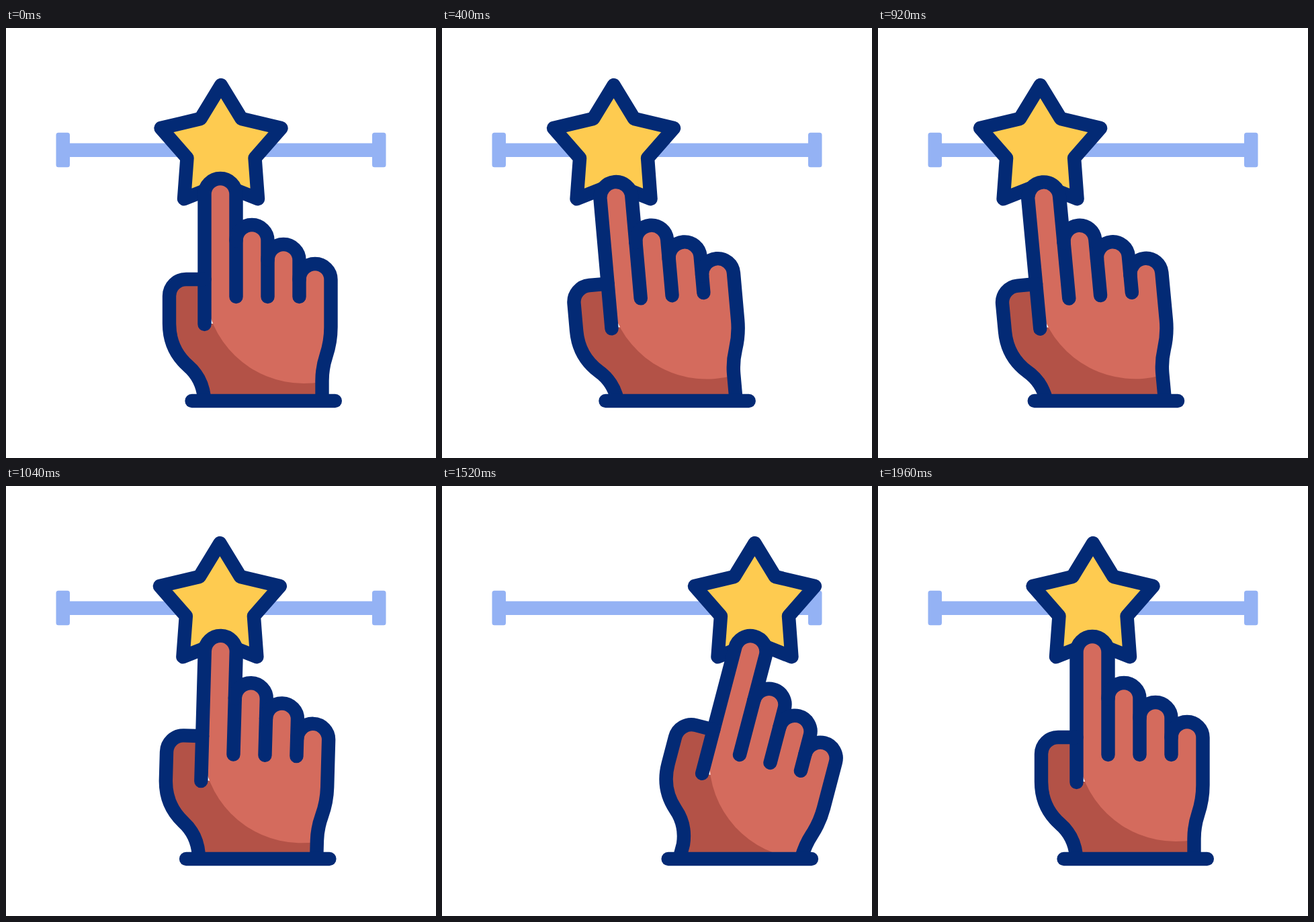
An HTML page for the animation above (2000 ms loop, 640 by 640 pixels).

```html
<!DOCTYPE html>
<html lang="en">
<head>
<meta charset="utf-8">
<title>Slide gesture</title>
<style>
  html, body { margin: 0; width: 100%; height: 100%; overflow: hidden; background: #fff; }
  svg { display: block; width: 100%; height: 100%; }
  .track { fill: #94b2f4; }
  .line { fill: none; stroke: #032a75; stroke-width: 20.4; stroke-linecap: round; stroke-linejoin: round; }
  .star { fill: #fecb50; }
  .skin { fill: #d46b5d; }
  .shade { fill: #b35247; }
</style>
</head>
<body>
<svg viewBox="0 0 640 640">
  <clipPath id="aboveCuff"><rect width="640" height="555"/></clipPath>

  <g class="track">
    <rect x="85" y="171.5" width="470" height="20.5"/>
    <rect x="74.5" y="155.8" width="20.5" height="51.5" rx="3.5"/>
    <rect x="545" y="155.8" width="20.5" height="51.5" rx="3.5"/>
  </g>

  <path id="star" class="line star" d="M320 85L350.5 135L409.5 149L370.5 193.5L375 254.3
    L320 232.5L265 254.3L269.5 193.5L230.5 149L289.5 135Z"/>

  <g clip-path="url(#aboveCuff)">
    <g id="hand">
      <path class="shade" d="M295.5 374H268a25 25 0 0 0-25 25V440C243 468 254 488 271 503
        C285 515 293 532 295 550V590H470.5V440H295.5Z"/>
      <path class="skin" d="M295.5 416V247.5a23.5 23.5 0 0 1 47 0V316.5a23.5 23.5 0 0 1 47 0
        V345.5a23.5 23.5 0 0 1 47 0V374.5a23.5 23.5 0 0 1 47 0V445c0 18-3 31-7 43c-4 12-6 24-6 37
        V526.4A147 147 0 0 1 300 416Z"/>
      <g class="line">
        <path d="M295.5 441V247.5a23.5 23.5 0 0 1 47 0V400"/>
        <path d="M342.5 316.5a23.5 23.5 0 0 1 47 0V400"/>
        <path d="M389.5 345.5a23.5 23.5 0 0 1 47 0V400"/>
        <path d="M436.5 374.5a23.5 23.5 0 0 1 47 0V445c0 18-3 31-7 43c-4 12-6 24-6 37V590"/>
        <path d="M295.5 374H268a25 25 0 0 0-25 25V440C243 468 254 488 271 503
          C285 515 293 532 295 550V590"/>
      </g>
    </g>
  </g>

  <path id="cuff" class="line" d="M276.5 555H489.8"/>
</svg>
<script>
  const LOOP = 2000, STEP = 40;
  // Each pose: time in ms, star shift, wrist shift, hand angle
  const poses = [
    [0, 0, 0, 0],
    [120, 0, 0, 0],
    [720, -143.2, -73.5, -11.2],
    [1400, 167.3, 69.2, 16.9],
    [1930, 0, 0, 0],
    [LOOP, 0, 0, 0]
  ];
  const [star, hand, cuff] = ["star", "hand", "cuff"].map(id => document.getElementById(id));
  const smooth = s => s * s * (3 - 2 * s);

  function poseAt(t) {
    const i = poses.findIndex(p => p[0] > t);
    const a = poses[i - 1], b = poses[i];
    const k = smooth((t - a[0]) / (b[0] - a[0]));
    return a.map((v, n) => v + (b[n] - v) * k);
  }

  function draw(t) {
    const [, slide, wrist, angle] = poseAt(t);
    star.setAttribute("transform", `translate(${slide})`);
    cuff.setAttribute("transform", `translate(${wrist})`);
    hand.setAttribute("transform", `translate(${wrist}) rotate(${angle} 362.5 556.5)`);
  }

  const start = performance.now();
  function tick() {
    // The motion runs at 25 steps a second; the small lead absorbs timer jitter
    const t = performance.now() - start + 6;
    draw(Math.floor(t / STEP) * STEP % LOOP);
    requestAnimationFrame(tick);
  }
  tick();
</script>
</body>
</html>
```
